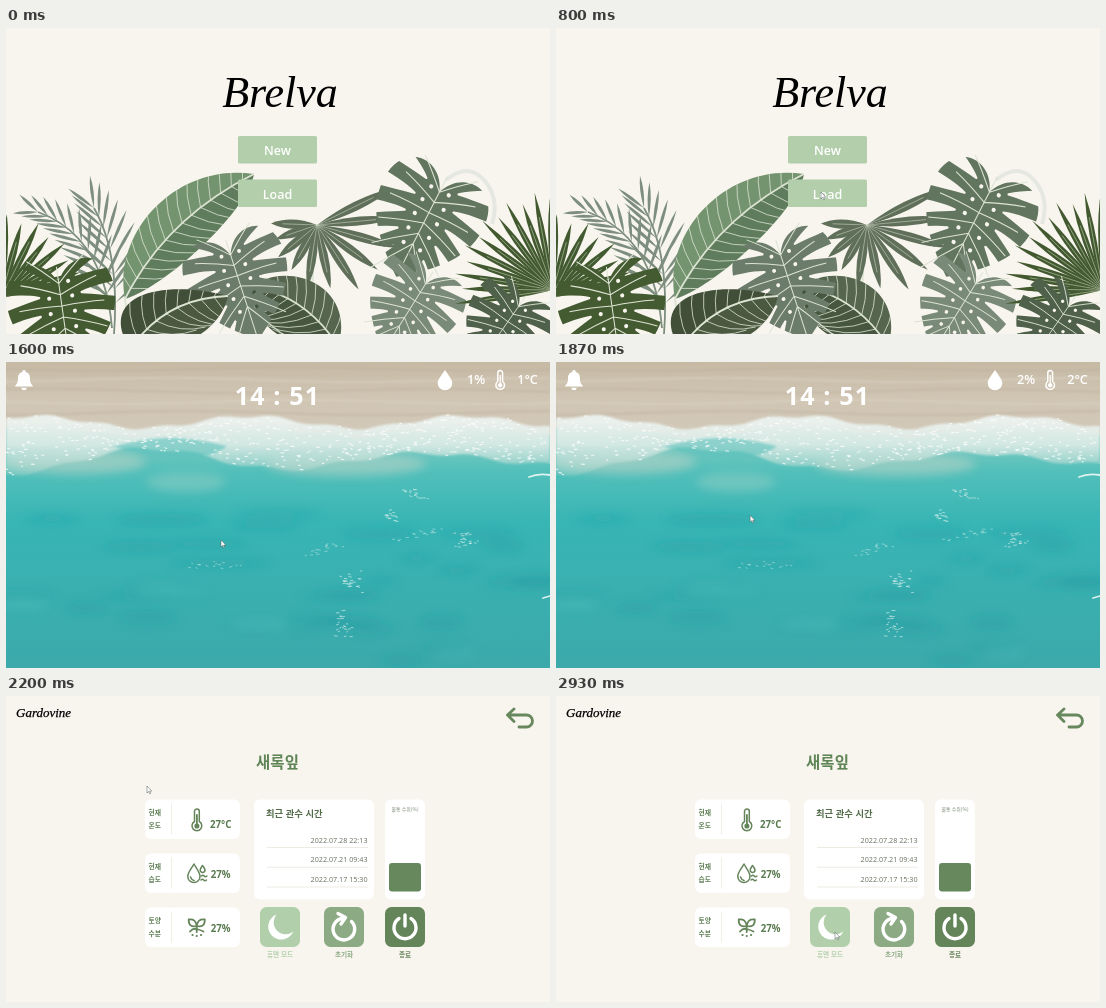
Write an HTML page that moves like this. It is 544x306 px and loops after 2990 ms.

```html
<!DOCTYPE html>
<html lang="ko">
<head>
<meta charset="utf-8">
<title>Plant monitor</title>
<style>
html, body { margin: 0; width: 100%; height: 100%; overflow: hidden; background: #f8f5ee; }
svg { display: block; width: 100vw; height: 100vh; }
text { font-family: "Open Sans", "Noto Sans", sans-serif; font-weight: 600; }
.ko { font-family: "Noto Sans CJK KR", "Noto Sans CJK", sans-serif; font-weight: 700; }
.brand { font-family: "Liberation Serif", serif; font-style: italic; font-weight: 400; }
.bold { font-weight: 700; }
.thin { font-weight: 400; }
.mid { text-anchor: middle; }
.end { text-anchor: end; }
.line { fill: none; stroke-linecap: round; stroke-linejoin: round; }
</style>
</head>
<body>
<svg viewBox="0 0 544 306" preserveAspectRatio="none">
  <defs>
    <linearGradient id="sand" x2="0" y2="1">
      <stop offset="0" stop-color="#c6baa5"/><stop offset=".4" stop-color="#d0c5b3"/><stop offset="1" stop-color="#d3cabb"/>
    </linearGradient>
    <linearGradient id="water" x2="0" y2="1">
      <stop offset="0" stop-color="#8fcfc5"/><stop offset=".2" stop-color="#52bfba"/>
      <stop offset=".4" stop-color="#38b5b5"/><stop offset="1" stop-color="#3ca9ab"/>
    </linearGradient>
    <linearGradient id="foam" x2="0" y2="1">
      <stop offset=".1" stop-color="#eaf0ec"/><stop offset=".5" stop-color="#dcebe6" stop-opacity=".9"/>
      <stop offset="1" stop-color="#b4d9cf" stop-opacity=".35"/>
    </linearGradient>
    <filter id="blur" x="-30%" y="-80%" width="160%" height="260%"><feGaussianBlur stdDeviation="5"/></filter>
    <filter id="edge"><feGaussianBlur stdDeviation="1"/></filter>
    <mask id="slits" maskUnits="userSpaceOnUse" x="-1" y="-1" width="3" height="2"></mask>
  </defs>

  <g id="home">
    <rect width="544" height="306" fill="#f8f5ee"/>
    <g id="leaves"></g>
    <text class="brand mid" x="274" y="79" font-size="44">Brelva</text>
    <g fill="#b2ceab">
      <rect x="232" y="108" width="79" height="27.5" rx="1.5"/>
      <rect x="232" y="151.500" width="79" height="27.5" rx="1.5"/>
    </g>
    <g class="mid" fill="#fff" font-size="12.5">
      <text x="271.5" y="126.7">New</text>
      <text x="271.5" y="170.7">Load</text>
    </g>
  </g>

  <g id="sea">
    <g id="beach"></g>
    <g fill="#fff">
      <path d="M18 8a1.7 1.7 0 0 1 1.7 2C23 10.8 24 13.5 24 16.5c0 4 1 5.3 2.8 7.2v.8H9.2v-.8C11 21.8 12 20.500 12 16.5c0-3 1-5.7 4.3-6.5A1.700 1.700 0 0 1 18 8ZM15.4 25.8h5.2a2.6 2.5 0 0 1-5.2 0Z"/>
      <path d="M439 8C442 13 446.3 17 446.3 21.3a7.3 6.9 0 0 1-14.6 0C431.7 17 436 13 439 8Z"/>
      <path class="line" d="M491.8 19.5V11a2.4 2.4 0 0 1 4.8 0V19.5a4.3 4.3 0 1 1-4.8 0Z" stroke="#fff" stroke-width="1.5"/>
      <path d="M493.6 13h1.2v8a2.2 2.2 0 1 1-1.2 0Z"/>
      <g class="mid" font-size="12.7">
        <text id="humid" x="470" y="22"></text>
        <text id="temp" x="521.5" y="22"></text>
      </g>
      <text id="clock" class="mid bold" x="271.5" y="43" font-size="25" letter-spacing="1.2">14 : 51</text>
    </g>
  </g>

  <g id="panel">
    <rect width="544" height="306" fill="#f8f5ee"/>
    <text class="brand" x="10" y="21" font-size="13" stroke="#000" stroke-width=".25">Gardovine</text>
    <path class="line" d="M508 13L501.5 19L508 25.5M502 19H520.5A6 6 0 0 1 520.5 31H513" stroke="#67875d" stroke-width="2.8"/>
    <text class="ko mid" x="271.5" y="71.5" font-size="15.5" fill="#5f8556">새록잎</text>
    <g id="cards"></g>

    <g class="line" stroke="#64845a" stroke-width="1.5">
      <path d="M188.5 125.5V115.5a2.4 2.4 0 0 1 4.8 0V125.5a4.9 4.9 0 1 1-4.8 0Z"/>
      <path d="M190.900 119V130" stroke-width="1.8"/>
      <circle cx="190.900" cy="130" r="1.8" fill="#64845a"/>
      <path d="M188 168C190 172 194 176 194 180.5a6.1 6.1 0 0 1-12.2 0C181.8 176 186 172 188 168ZM196.5 169.5q2.5 3 2.5 4.5a2.4 2.4 0 0 1-4.8 0q0-1.5 2.3-4.5ZM184.5 181q1 3 3.5 3.5M195.5 180q1.5-1.5 2.7 0t2.7 0M195 184q1.5-1.5 2.7 0t2.7 0"/>
      <path d="M190.7 236V229M190.7 230Q182.5 232 182.7 223.5Q190 222.5 190.7 230ZM190.7 230Q199 232 198.8 223.5Q191.5 222.5 190.7 230ZM184 235.5Q187 232 190.7 233T197.5 235.5" stroke-width="1.8"/>
      <path d="M186.5 239h.1M190.7 240h.1M195 239h.1" stroke-width="2.2"/>
    </g>

    <text class="ko" x="260" y="121" font-size="9.3" fill="#526b49">최근 관수 시간</text>
    <g id="dates"></g>
    <text class="ko mid thin" x="399" y="115" font-size="4.9" fill="#7c8a75">물통 수위(%)</text>
    <rect x="383" y="167" width="32" height="28.5" rx="3" fill="#67875d"/>
    <g id="actions"></g>
    <path d="M270.5 218.5A13 13 0 1 0 287.3 235.5A12 12 0 0 1 270.5 218.5Z" fill="#fff"/>
    <g class="line" stroke="#fff" stroke-width="3.4">
      <path d="M345.5 225.500A10.8 10.8 0 1 1 336 222.500M332 217.500L339.5 221.5L335 228"/>
      <path d="M393 222.5A11 11 0 1 0 405 222.5M399 219V230"/>
    </g>
  </g>

  <path id="cursor" d="M0 0V7L1.6 5.5 2.7 7.8 3.7 7.3 2.6 5.1H4.8Z" fill="#fff" stroke="#4f5a58" stroke-width=".5"/>
</svg>
<script>
const LOOP = 2990, STEP = 200 / 3;
const VEIN = '#dde4d3';
const $ = id => document.getElementById(id);
const rad = deg => deg * Math.PI / 180;
const list = (n, make) => Array.from({ length: n }, (_, i) => make(i)).join('');
const path = (d, fill, more = '') => `<path d="${d}" fill="${fill}" ${more}/>`;
const vein = (d, w, more = '') => path(d, 'none', `stroke="${VEIN}" stroke-width="${w}" ${more}`);
const polar = (p, r, a) => [p[0] + r * Math.cos(a), p[1] + r * Math.sin(a)];

let seed = 7;
const rand = () => (seed = seed * 16807 % 2147483647) / 2147483647;
const spread = () => rand() + rand() - 1;

// Point and heading on a quadratic curve
function along(a, q, b, s) {
  const at = i => (1 - s) ** 2 * a[i] + 2 * s * (1 - s) * q[i] + s * s * b[i];
  const slope = i => (1 - s) * (q[i] - a[i]) + s * (b[i] - q[i]);
  return { p: [at(0), at(1)], dir: Math.atan2(slope(1), slope(0)) };
}

function leaflet(p, len, dir, w, color) {
  const mid = polar(p, len * 0.55, dir), tip = polar(p, len, dir);
  return path(`M${p}Q${polar(mid, w, dir + 1.57)} ${tip}Q${polar(mid, w, dir - 1.57)} ${p}Z`, color);
}

// Leaflets from one hub; lean makes the right side longer
function fan(hub, from, to, n, len, lean, w, color) {
  return list(n, i => {
    const a = rad(from + (to - from) * i / (n - 1));
    const r = (len + lean * Math.cos(a)) * (i % 2 ? 0.92 : 1);
    return leaflet(hub, r, a, w, color) + vein(`M${hub}L${polar(hub, r * 0.75, a)}`, 0.5);
  });
}

function feather(a, q, b, n, size, color) {
  return list(n, i => {
    const s = 0.2 + 0.8 * i / (n - 1), { p, dir } = along(a, q, b, s);
    const len = size * (1.1 - 0.5 * s);
    return [-1, 1].map(k => leaflet(p, len, dir + k * (0.95 - 0.55 * s), 3.2, color)).join('');
  }) + path(`M${a}Q${q} ${b}`, 'none', `stroke="${color}" stroke-width="1.8"`);
}

// Broad leaf: two halves on either side of a curved rib
let clips = 0;
function blade(a, b, left, right, q, colors, n, reach) {
  const half = c => `M${a}C${c} ${b}Q${q} ${a}Z`, id = 'clip' + clips++;
  const ribs = list(n, i => {
    const { p, dir } = along(a, q, b, i / n);
    return [-1, 1].map(k => `M${p}Q${polar(p, reach * 0.55, dir + k * 1.15)} ${polar(p, reach, dir + k * 0.8)}`).join('');
  });
  return `<clipPath id="${id}"><path d="${half(left)}${half(right)}"/></clipPath>` +
    path(half(left), colors[0]) + path(half(right), colors[1]) +
    vein(ribs, 0.8, `clip-path="url(#${id})"`) + vein(`M${a}Q${q} ${b}`, 1.8);
}

// Split leaf of unit length; side veins bend towards the tip
function sidePoint(i, u, k) {
  const a = rad(138 - 20 * i);
  return [0.06 + 0.12 * i + u * Math.cos(a) + 0.3 * u * u, k * u * Math.sin(a)];
}
const sides = make => [-1, 1].map(make).join('');
const HEART = 'M.06 0' + sides(k => `C-.28 ${k * 0.12} -.26 ${k * 0.58} .2 ${k * 0.58}C.6 ${k * 0.58} .85 ${k * 0.25} 1.05 0L.06 0`) + 'Z';
const SIDE_VEINS = 'M-.12 0L1 0' + sides(k => list(6, i =>
  `M${sidePoint(i, 0, k)}Q${sidePoint(i, 0.25, k)} ${sidePoint(i, 0.46, k)}`));
$('slits').innerHTML = '<rect x="-1" y="-1" width="3" height="2" fill="#fff"/>' + sides(k => list(5, i => {
  const j = i + 0.5, p = (d, u) => sidePoint(j + d, u, k);
  const hole = sidePoint(j, 0.13, k);
  return path(`M${p(0, 0.24)}Q${p(0.2, 0.42)} ${p(0.32, 0.85)}L${p(-0.2, 0.85)}Q${p(-0.15, 0.42)} ${p(0, 0.24)}Z`,
    '#000', 'stroke="#000" stroke-width=".025" stroke-linejoin="round"') +
    `<circle cx="${hole[0]}" cy="${hole[1]}" r=".022"/>`;
}));
const monstera = (x, y, size, angle, color) =>
  `<g transform="translate(${x} ${y}) rotate(${angle}) scale(${size})">` +
  path(HEART, color, 'mask="url(#slits)"') + vein(SIDE_VEINS, 0.011) + '</g>';

$('leaves').innerHTML = [
  feather([106, 300], [98, 208], [32, 184], 11, 42, '#7d8e7e'),
  feather([108, 306], [114, 225], [88, 180], 9, 54, '#7d8e7e'),
  path('M440 152Q462 134 478 152T486 196', 'none', 'stroke="#e5e8e0" stroke-width="4"'),
  blade([119, 271], [248, 146], [106, 205, 170, 134], [160, 258, 241, 184], [160, 190], ['#74946f', '#5f7d5d'], 15, 70),
  vein('M119 271Q122 290 122 306', 2),
  vein('M311 197Q308 225 306 260', 2),
  fan([311, 197], 182, -26, 11, 66, 20, 9, '#5f6f5a'),
  monstera(436, 159, 96, 117, '#62755f'),
  blade([332, 318], [245, 258], [350, 262, 288, 230], [280, 325, 245, 295], [300, 268], ['#56664e', '#46563f'], 11, 60),
  monstera(223, 222, 90, 72, '#6c7c6a'),
  monstera(422, 252, 82, 122, '#7a8a78'),
  blade([124, 322], [222, 268], [88, 262, 165, 252], [180, 325, 215, 300], [158, 270], ['#414f38', '#4a5940'], 9, 50),
  fan([547, 262], 172, 268, 12, 99, 0, 6, '#42592f'),
  monstera(515, 275, 76, 125, '#4f614a'),
  fan([-5, 270], -86, -18, 7, 84, 0, 7, '#425a30'),
  monstera(52, 250, 94, 82, '#445b32'),
].join('');

// Shore: wavy bands and seeded specks
const shore = x => 60 - 6 * Math.cos((x - 30) / 34) + 1.5 * Math.sin(x / 9);
const wash = x => 98 + (14 - x / 60) * Math.cos((x - 283) / 44) + 2 * Math.sin(x / 11);
const band = (y, from = 0, to = 544) => list((to - from) / 4 + 1, i => `L${from + 4 * i} ${y(from + 4 * i).toFixed(1)}`);
const speck = (x, y) => `M${x.toFixed(1)} ${y.toFixed(1)}l${(1 + 2 * rand()).toFixed(1)} ${spread().toFixed(1)}`;
const patch = (x, y, w, h, slant = 0) => list(Math.ceil(w * h / 8), () => {
  const u = spread();
  return speck(x + u * w, y + spread() * h + u * slant);
});
const foamSpecks = list(420, () => {
  const x = rand() * 544, top = shore(x);
  return speck(x, top + (wash(x) - top) * rand());
});
const strokes = (d, color, w, opacity) => path(d, 'none', `class="line" stroke="${color}" stroke-width="${w}" opacity="${opacity}"`);
const blob = (x, y, rx, ry, color, opacity) => `<ellipse cx="${x}" cy="${y}" rx="${rx}" ry="${ry}" fill="${color}" opacity="${opacity}"/>`;

$('beach').innerHTML = [
  '<rect width="544" height="90" fill="url(#sand)"/>',
  '<g filter="url(#edge)">',
  list(5, i => strokes('M-9 0' + band(x => 7 + i * 11 + 2 * Math.sin(x / 60 + i * 2)), i % 2 ? '#ded5c6' : '#bdb09b', 1.6, 0.6)),
  '</g>',
  path('M0 306' + band(x => shore(x) + 9) + 'V306Z', 'url(#water)'),
  '<g filter="url(#blur)">',
  blob(70, 100, 70, 12, '#b5d3c6', 0.6), blob(340, 102, 80, 12, '#b2d3c7', 0.6), blob(180, 120, 40, 10, '#86cbc3', 0.6),
  list(34, () => blob(rand() * 544, 150 + rand() * 150, 15 + rand() * 35, 3 + rand() * 4, rand() < 0.6 ? '#1f989e' : '#55c3c1', 0.3)),
  '</g>',
  path('M0 104' + band(shore) + band(x => wash(544 - x)).replace(/L(\d+) /g, (_, x) => `L${544 - x} `) + 'Z', 'url(#foam)', 'filter="url(#edge)"'),
  path('M105 84' + band(x => 85 - 9 * Math.sin((x - 105) / 38), 105, 221) + 'Q190 108 105 84Z', '#5fc2bc', 'opacity=".6" filter="url(#edge)"'),
  strokes(foamSpecks, '#fff', 1.1, 0.75),
  strokes([patch(406, 130, 20, 6, 4), patch(384, 155, 12, 9), patch(459, 178, 17, 10), patch(346, 220, 16, 12),
    patch(336, 262, 10, 18)].join(''), '#e4f5f2', 0.8, 0.75),
  strokes(patch(315, 188, 26, 5, -8) + patch(415, 172, 34, 4, -9) + patch(210, 203, 30, 4), '#d0efec', 0.8, 0.6),
  strokes('M523 115Q532 111 544 113M537 236L544 234', '#eef8f6', 1.8, 0.9),
].join('');

const card = (x, y, w, h) => `<rect x="${x}" y="${y}" width="${w}" height="${h}" rx="6" fill="#fff"/>`;
const label = (s, x, y, size, color, cls) => `<text class="${cls}" x="${x}" y="${y}" font-size="${size}" fill="${color}">${s}</text>`;

$('cards').innerHTML = card(248, 103.5, 120, 100) + card(379, 103.5, 40, 100) +
  [['현재', '온도', '27°C'], ['현재', '습도', '27%'], ['토양', '수분', '27%']].map(([a, b, v], i) => {
    const y = 103.5 + i * 54;
    return card(139, y, 95, 39.5) + `<rect x="165" y="${y + 4}" width="1" height="31" fill="#f0eee5"/>` +
      label(a, 148.7, y + 15.5, 6.8, '#5f7f55', 'ko mid') + label(b, 148.7, y + 28.8, 6.8, '#5f7f55', 'ko mid') +
      label(v, 214.7, y + (i ? 24 : 28), 9.7, '#5a7a50', 'mid bold');
  }).join('');

$('dates').innerHTML = ['2022.07.28 22:13', '2022.07.21 09:43', '2022.07.17 15:30'].map((s, i) => {
  const y = 146.5 + i * 19.8;
  return label(s, 361.5, y, 7.2, '#66705f', 'end thin') + `<rect x="261" y="${y + 4.5}" width="101" height=".8" fill="#e9e6dc"/>`;
}).join('');

$('actions').innerHTML = [['휴면 모드', 254, '#b2cfab'], ['초기화', 318, '#8cab85'], ['종료', 379, '#64845a']].map(([s, x, c]) =>
  `<rect x="${x}" y="211" width="40" height="40" rx="6.5" fill="${c}"/>` + label(s, x + 20, 261, 6.6, c, 'ko mid')).join('');

// Pointer moves: start, end, then where it stops
const MOVES = [[70, 600, 265, 164], [1270, 1600, 215, 178], [1730, 2130, 141, 90], [2270, 2670, 392, 246], [2670, 2930, 279, 236]];

function pointer(t) {
  let x = 262, y = 308;
  for (const [from, to, toX, toY] of MOVES) {
    const k = Math.min(1, Math.max(0, (t - from) / (to - from))), ease = k * k * (3 - 2 * k);
    x += (toX - x) * ease;
    y += (toY - y) * ease;
  }
  return [x, y];
}

function draw(time) {
  // The screen refreshes 15 times a second, on 10 ms marks
  const t = Math.round(Math.floor((time + 4) / STEP) * STEP / 10) * 10;
  const scene = t < 1270 ? 'home' : t < 2200 ? 'sea' : 'panel';
  for (const id of ['home', 'sea', 'panel']) $(id).style.display = id === scene ? '' : 'none';
  const value = t < 1330 ? 27 : 1 + Math.floor((t - 1330) / 370);
  $('humid').textContent = value + '%';
  $('temp').textContent = value + '°C';
  $('clock').style.display = t < 1330 ? 'none' : '';
  $('cursor').setAttribute('transform', `translate(${pointer(t)})`);
}

function tick() {
  draw(performance.now() % LOOP);
  requestAnimationFrame(tick);
}
tick();
</script>
</body>
</html>
```
